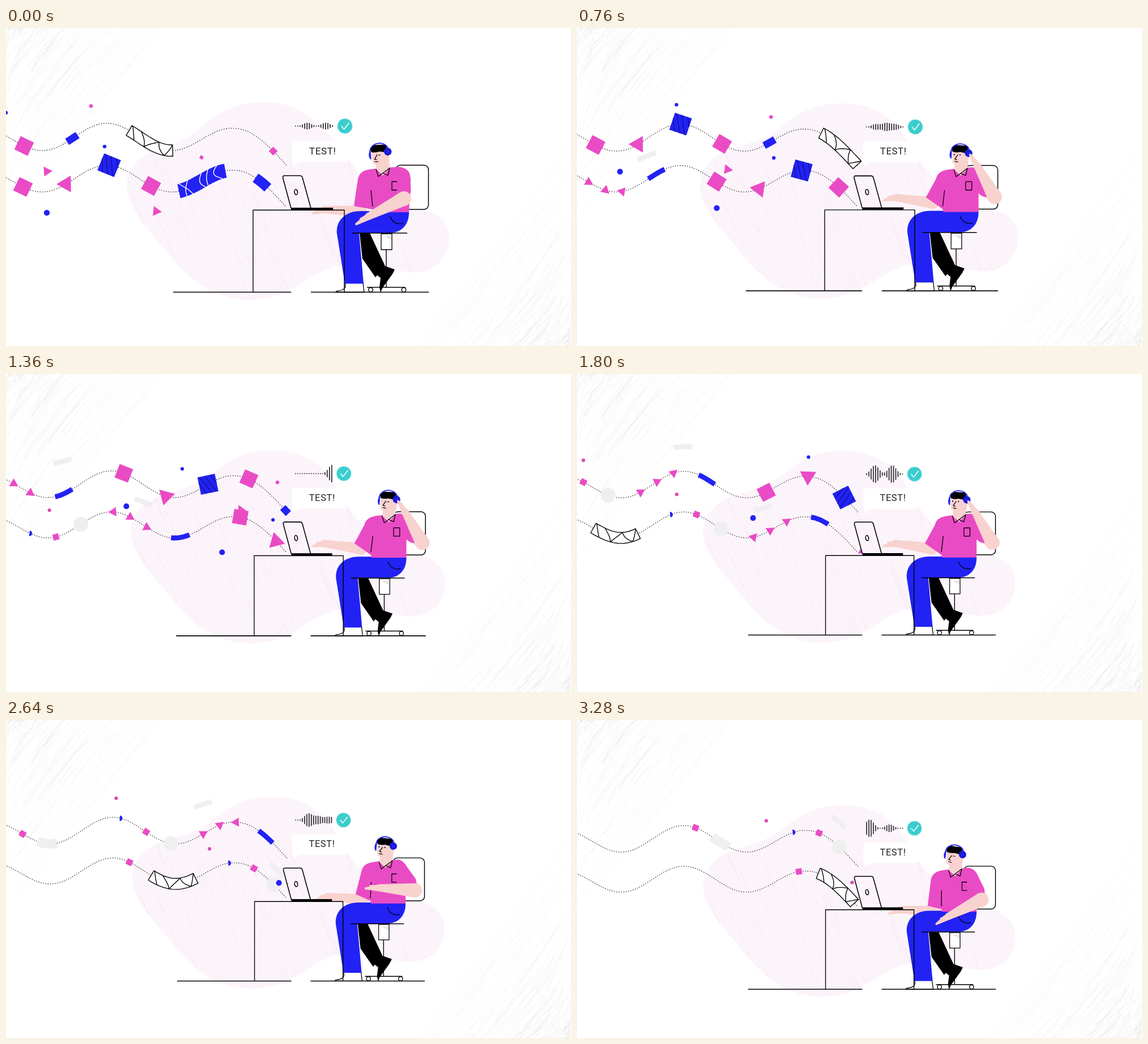
These frames come from a looping animation (997x561 px, 3.32 s). An HTML page with a canvas:

```html
<!DOCTYPE html>
<html lang="en">
<head>
<meta charset="utf-8">
<title>Sound test at the desk</title>
<style>
  html, body { margin: 0; width: 100%; height: 100%; overflow: hidden; background: #fff; }
  canvas { display: block; }
</style>
</head>
<body>
<canvas id="stage" width="997" height="561"></canvas>
<script>
const W = 997, H = 561, LOOP = 3320, STEP = 40;
const PINK = '#e94bc5', BLUE = '#2222f4', SKIN = '#f8d2ce', INK = '#000', GREY = '#efeff0';
const ctx = document.getElementById('stage').getContext('2d');
const DEG = Math.PI / 180;

// ---------- helpers ----------
const clamp = u => Math.min(Math.max(u, 0), 1);
const mix = (a, b, u) => a + (b - a) * u;

function ramp(t, from, to) {
  const u = clamp((t - from) / (to - from));
  return u * u * (3 - 2 * u);
}

function random(seed) {
  return () => (seed = (seed * 16807) % 2147483647) / 2147483647;
}

function paint(path, fill, stroke, width = 1.5) {
  const p = typeof path === 'string' ? new Path2D(path) : path;
  if (fill) { ctx.fillStyle = fill; ctx.fill(p); }
  if (stroke) { ctx.strokeStyle = stroke; ctx.lineWidth = width; ctx.stroke(p); }
}

function poly(points, closed = true) {
  const p = new Path2D();
  points.forEach(([x, y], i) => i ? p.lineTo(x, y) : p.moveTo(x, y));
  if (closed) p.closePath();
  return p;
}

function disc(x, y, r, fill, stroke, width) {
  const p = new Path2D();
  p.arc(x, y, r, 0, 7);
  paint(p, fill, stroke, width);
}

// tapered limb between two round ends
function limb(x1, y1, r1, x2, y2, r2, color) {
  const a = Math.atan2(y2 - y1, x2 - x1) + Math.PI / 2;
  const c = Math.cos(a), s = Math.sin(a);
  paint(poly([[x1 + c * r1, y1 + s * r1], [x2 + c * r2, y2 + s * r2],
              [x2 - c * r2, y2 - s * r2], [x1 - c * r1, y1 - s * r1]]), color);
  disc(x1, y1, r1, color);
  disc(x2, y2, r2, color);
}

// ---------- tracks ----------
const PERIOD = 224, CREST = 178, LAST_CREST = CREST + PERIOD;

// a gentle wave that dives towards the laptop after its last crest
function track(base, amp) {
  const y = x => x < LAST_CREST
    ? base + 9 * ((x - CREST) / PERIOD) ** 2 - amp * Math.cos((x - CREST) / PERIOD * 2 * Math.PI)
    : base + 9 - amp + 63 * (1 - Math.cos(Math.PI * (x - LAST_CREST) / 182));
  const angle = x => Math.atan2(y(x + 2) - y(x - 2), 4);
  return { y, angle };
}

const upper = track(191, 23), lower = track(264.5, 22.5);
const high = track(148, 15), midA = track(223, 14), midB = track(240, 11), low = track(315, 9);

// place at distance s along and v across the track, seen from x
function offset(tr, x, s, v) {
  const px = x + s * Math.cos(tr.angle(x + s / 2));
  const a = tr.angle(px);
  return [px - v * Math.sin(a), tr.y(px) + v * Math.cos(a)];
}

// ---------- travelling shapes ----------
// a band that bends with its track, with slanted seams across it
function ribbon(len, wide, fill, stroke, seams = [], seamColor) {
  return (x, tr) => {
    const top = [], bottom = [];
    for (let i = 0; i <= 12; i++) {
      const s = (i / 12 - .5) * len;
      top.push(offset(tr, x, s, -wide / 2));
      bottom.unshift(offset(tr, x, s, wide / 2));
    }
    paint(poly(top.concat(bottom)), fill, stroke, 1.4);
    for (const [from, to, bow] of seams) {
      const line = [];
      for (let u = 0; u <= 1; u += .125) {
        const s = mix(from, to, u) + bow * Math.sin(Math.PI * u);
        line.push(offset(tr, x, s * len, (u - .5) * wide));
      }
      paint(poly(line, false), null, seamColor, 1.4);
    }
  };
}

function turned(draw, turn = a => a) {
  return (x, tr, t) => {
    ctx.save();
    ctx.translate(x, tr.y(x));
    ctx.rotate(turn(tr.angle(x), t));
    draw();
    ctx.restore();
  };
}

function square(size, turn) {
  return turned(() => {
    ctx.fillStyle = PINK;
    ctx.fillRect(-size / 2, -size / 2, size, size);
  }, turn);
}

function triangle(r, turn) {
  return turned(() => paint(poly([0, 120, 240].map(a =>
    [r * Math.cos(a * DEG), r * Math.sin(a * DEG)])), PINK), turn);
}

const dot = (r, color) => (x, tr) => disc(x, tr.y(x), r, color);

const striped = turned(() => {
  ctx.fillStyle = BLUE;
  ctx.fillRect(-16, -16, 32, 32);
  paint('M-16 -6L-6 16M-13 -16L4 16M-3 -16L13 16M8 -16L16 0', null, '#0d0d7c', 1.1);
}, a => a + 18 * DEG);

const half = turned(() => paint('M-2 -5A5 5 0 0 1 -2 5Z', BLUE), a => a * .3);
const wrap = ribbon(86, 20, '#fff', INK,
  [[-.48, -.3, 0], [-.27, -.06, .04], [.17, -.06, -.03], [.17, .35, -.03], [.5, .35, 0]], INK);
const blueWrap = ribbon(90, 25, BLUE, null,
  [[-.46, -.27, .03], [-.26, -.38, -.04], [.06, 0, -.08], [.2, .06, -.03], [.37, .4, -.12]], '#fff');
const bar = ribbon(34, 9, BLUE), greyBar = ribbon(34, 9, GREY), greyBlock = ribbon(35, 17, GREY);
const block = square(26), chip = square(11), gem = square(6, () => 30 * DEG);
const wedge = triangle(17, a => a + 90 * DEG);
const arrow = triangle(9.5, a => 60 * DEG - a);
const looseArrow = triangle(10, a => a * .6);
const greyDisc = dot(13.5, GREY), bead = dot(5.2, BLUE), blueDot = dot(3.2, BLUE), pinkDot = dot(3.2, '#d94bb4');

// both lanes carry the same train: [shape, gap to the one ahead]
const train = [[striped, 74], [wedge, 76], [block, 76], [bar, 108], [arrow, 61], [arrow, 30], [arrow, 30],
               [greyDisc, 59], [chip, 45], [half, 46]];
const lanes = [
  { tr: upper, speed: .29, start: 482, cars: [[chip, 0], [wrap, 229], [ribbon(22, 13, BLUE), 136], [block, 85],
    ...train, [greyBlock, 134], [chip, 45]] },
  { tr: lower, speed: .28, start: 457, cars: [[ribbon(28, 18, BLUE), 0], [blueWrap, 111], [block, 90],
    ...train, [wrap, 103], [chip, 79]] }
];

// loose bits: [speed, [shape, track, start], ...]
const drifters = [
  [.25, [gem, high, 150], [gem, midA, 345], [looseArrow, midB, 72], [looseArrow, low, 265]],
  [.225, [blueDot, high, 0], [pinkDot, high, -410], [blueDot, midA, 174], [pinkDot, midA, -240],
    [bead, midB, -101], [bead, low, 72]],
  [.197, [greyBar, track(138, 15), -178], [greyBar, midA, -32]]
];

// the dive is steeper, so shapes advance less there
function place(shape, tr, x, t) {
  if (x > 430) x = mix(430, x, .8);
  if (x > -70 && x < 540) shape(x, tr, t);
}

const opening = poly([[-80, 0], [507, 0], [507, 236], [490, 253], [489, 262], [503, 318],
                      [437, 320], [437, 420], [-80, 420]]);

function drawFlow(t) {
  ctx.setLineDash([1.6, 2.7]);
  for (const { tr } of lanes) {
    const line = [];
    for (let x = -15; x <= 496; x += 3) line.push([x, tr.y(x)]);
    paint(poly(line, false), null, '#1a1a1a', 1.2);
  }
  ctx.setLineDash([]);
  ctx.save();
  ctx.clip(opening);
  for (const { tr, speed, start, cars } of lanes) {
    let x = start + speed * t;
    for (const [shape, gap] of cars) place(shape, tr, x -= gap, t);
  }
  for (const [speed, ...bits] of drifters) {
    for (const [shape, tr, start] of bits) place(shape, tr, start + speed * t, t);
  }
  ctx.restore();
}

// ---------- backdrop ----------
const scribble = document.createElement('canvas');
scribble.width = W;
scribble.height = H;
{
  const g = scribble.getContext('2d'), rnd = random(77);
  for (const corner of [0, 1]) {
    g.save();
    if (corner) { g.translate(W, H); g.rotate(Math.PI); }
    for (let i = 0; i < 300; i++) {
      const d = 15 + 265 * Math.pow(rnd(), 1.25);
      const u = rnd() * .8, v = u + .15 + rnd() * .35;
      const at = k => [d * k, d * 1.3 * (1 - k) - 40 * k * (1 - k)];
      const [x1, y1] = at(u), [x2, y2] = at(v);
      g.strokeStyle = `rgba(60,60,60,${.012 + .04 * rnd() * (1 - d / 320)})`;
      g.lineWidth = .5 + rnd() * 1.3;
      g.beginPath();
      g.moveTo(x1, y1);
      g.quadraticCurveTo((x1 + x2) / 2 - 6, (y1 + y2) / 2 - 6, x2, y2);
      g.stroke();
    }
    g.restore();
  }
}

function drawBlob(t) {
  const k = 14 * ramp(t, 0, 900);
  const blob = new Path2D(`M${455 + k} 131C${500 + k} 131 ${530 + k} 147 ${556 + k} 174C590 205 606 240 640 275` +
    'C675 308 700 312 735 320C768 328 782 348 782 372C781 405 757 431 720 431C682 431 655 415 610 416' +
    'C560 418 535 446 500 463C465 480 430 484 395 476C340 462 308 426 278 388C250 353 213 318 213 278' +
    `C214 243 240 222 275 210C312 200 ${328 + k} 190 ${352 + k} 168C${385 + k} 140 ${420 + k} 131 ${455 + k} 131Z`);
  paint(blob, '#fcf4fb');
  ctx.save();
  ctx.clip(blob);
  const rnd = random(19);
  for (let i = 0; i < 90; i++) {
    const x = 210 + rnd() * 540, y = 200 + rnd() * 250, len = 25 + rnd() * 60;
    paint(poly([[x, y], [x + len * .42, y + len]], false), null, 'rgba(246,205,234,.2)', 1 + rnd());
  }
  ctx.restore();
}

// ---------- sound bubble ----------
// bursts of sound: [time, loudness]
const bursts = [[-380, 6], [-100, 6], [340, 5], [500, 7], [640, 5], [1370, 16], [1640, 16],
                [2280, 12], [2430, 7], [2590, 6], [2770, 16], [3080, 7]];
const loudness = s => bursts.reduce((sum, [at, peak]) => sum + peak * Math.exp(-(((s - at) / 85) ** 2)), 0);

function drawBubble(t) {
  paint('M505 199H604V236H519L507 244L505 236Z', '#fff');
  ctx.fillStyle = '#222226';
  ctx.font = '17px Roboto, Arial, sans-serif';
  ctx.letterSpacing = '0.6px';
  ctx.fillText('TEST!', 535, 222.5);
  for (let i = 0; i <= 16; i++) {
    const h = Math.max(loudness(t - (16 - i) * 35), .8);
    ctx.fillRect(510 + i * 4.08, 173 - h, 1.7, h * 2);
  }
  disc(598, 173, 14, '#c9f0f0');
  disc(598, 173, 12.8, '#3bcdce');
  paint('M592 173L596.5 178.5L605.5 167', null, '#fff', 1.5);
}

// ---------- person ----------
const folded = { head: [0, -.06], chest: [0], elbow: [702, 301], hand: [618, 346], far: [541, 327], cuff: [614, 314] };
const resting = { head: [11, .13], chest: [7], elbow: [720, 303], hand: [638, 347], far: [552, 328], cuff: [622, 314] };
const listening = { head: [19, .06], chest: [14], elbow: [740, 298], hand: [696, 223], far: [542, 304], cuff: [617, 299] };

function blend(a, b, u) {
  const out = {};
  for (const key in a) out[key] = a[key].map((v, i) => mix(v, b[key][i], u));
  return out;
}

function poseAt(t) {
  const rise = ramp(t, 360, 740), up = rise - ramp(t, 2300, 2900);
  const p = blend(blend(folded, resting, ramp(t, 0, 320)), listening, up);
  p.elbow[0] += 30 * Math.sin(Math.PI * rise);
  p.hand[0] -= 24 * Math.sin(Math.PI * up);
  p.raised = up > .5;
  return p;
}

function forearm(x, y, r, [hx, hy], reach, lift) {
  const d = Math.hypot(x - hx, y - hy);
  const wx = hx + (x - hx) / d * reach, wy = hy + (y - hy) / d * reach - lift;
  limb(x, y, r, wx, wy, 6.5, SKIN);
  limb(wx, wy, 6.5, hx, hy, 2, SKIN);
  limb(wx, wy, 5, mix(hx, wx, .35), mix(hy, wy, .35) - 4, 2, SKIN);
}

function drawChair() {
  const back = new Path2D();
  back.roundRect(688, 242, 57.5, 78, 8);
  paint(back, '#fff', INK);
  paint('M662 363H681V391H662Z', '#fff', INK, 1.3);
  paint('M667 367H680V374Z', '#e4e4e6');
  paint('M671 391V457M637 457.5H705', null, INK, 1.4);
  for (const x of [643.5, 702]) disc(x, 461.8, 3.8, '#fff', INK, 1.4);
}

function drawLegs() {
  paint('M624 362H642L669 420L686 426L682 434L664 459L661 467L659 457L661 441L655 436L652 440L629 407Z', INK);
  paint('M598 450C601 458 597 463 584 464L582 466H632L630 450Z', '#fff', INK, 1.3);
  paint('M625 323H711C712 346 699 361.5 676 361.5H623L631 451H598L584.5 366C580 341 598 323 625 323Z', BLUE);
  paint('M678 332C681 343 690 347 701 345', null, INK, 1.2);
  paint('M611 361.8H708', null, INK, 1.6);
}

function drawHead([shift, tilt], chest, blink) {
  paint(`M${653 + chest} 249L${652 + shift} 228L${676 + shift} 222L${677 + chest} 248L${665 + chest} 260Z`, SKIN);
  ctx.save();
  ctx.translate(660 + shift, 224);
  ctx.rotate(tilt);
  ctx.translate(-660, -224);
  paint('M644 216C639 217 639 230 644 231Z', BLUE);
  paint('M645 213H674V236L652 240Q646 240 646 235Z', SKIN);
  paint('M643 211Q648 205 656 206L670 206Q675 212 672 220L659 218Q650 220 645 218Z', INK);
  paint('M642 220C643 199 670 199 675 213', null, BLUE, 1.8);
  paint('M655 223L650 231L654 232M650 235L656 236', null, INK, 1.3);
  if (blink) paint('M657 224H661', null, INK, 1.1);
  else for (const x of [648.5, 659]) disc(x, 223, 1.1, INK);
  disc(674, 219, 6.8, BLUE);
  disc(674, 219, 4.2, BLUE, '#0c0c86', 1.1);
  ctx.restore();
}

function drawShirt(c, [cuffX, cuffY]) {
  paint(`M648 325L647 320L${cuffX} ${cuffY}L${621 + c} 266Q${624 + c} 251 ${645 + c} 249L${653 + c} 248` +
    `L${665 + c} 260L${677 + c} 246L${692 + c * .5} 245Q${712 - c * .1} 246 ${714 - c * .2} 266L711 325Z`, PINK);
}

function drawShirtLines(c, raised) {
  paint(`M${653 + c} 249L${657 + c} 262L${665 + c} 256L${674 + c} 260L${677 + c} 247L${665 + c} 256`, null, INK, 1.3);
  paint(`M${644 + c * .45} 286L647 315`, null, INK, 1.3);
  const x = 681 + c * .5;
  paint(raised ? `M${x} 271H${x + 11}V286H${x}Z` : `M${x + 9} 271H${x}V286H${x + 9}`, null, INK, 1.3);
}

function drawPerson(t) {
  const { head, chest: [c], elbow: [ex, ey], hand, far, cuff, raised } = poseAt(t);
  const blink = t < 120 || Math.abs(t - 1350) < 90 || t > 3180;
  const sx = 698, sy = 262;
  drawChair();
  forearm(cuff[0] + 13, cuff[1] + 10, 10.5, far, 22, 6);
  drawLegs();
  limb(sx, sy, 12, ex, ey, 12, SKIN);
  drawShirt(c, cuff);
  limb(sx, sy, 15, mix(sx, ex, .62), mix(sy, ey, .62), 14, PINK);
  drawHead(head, c, blink);
  drawShirtLines(c, raised);
  forearm(ex, ey, 13, hand, 26, 2);
}

function drawDesk() {
  paint('M436 466V321.3H597V466', null, INK, 1.4);
  paint('M295 466H503M538 466H746', null, INK, 1.7);
  paint('M503 318L488.5 264Q488 260.5 491.5 260.5H519Q522 260.5 523 263.5L538 318', null, INK, 1.6);
  paint('M503 319H577', null, INK, 4);
  const mark = new Path2D();
  mark.ellipse(511.7, 289.5, 2.7, 4.8, -.15, 0, 7);
  paint(mark, null, INK, 1.6);
}

// ---------- loop ----------
function render(t) {
  const scale = 1 - .031 * clamp(t / 1800);
  ctx.fillStyle = '#fff';
  ctx.fillRect(0, 0, W, H);
  ctx.drawImage(scribble, 0, 0);
  ctx.save();
  ctx.translate(519, 287 + 14.5 * ramp(t, 2640, 2840));
  ctx.scale(scale, scale);
  ctx.translate(-519, -287);
  ctx.lineJoin = 'round';
  drawBlob(t);
  drawFlow(t);
  drawBubble(t);
  drawPerson(t);
  drawDesk();
  ctx.restore();
}

const begin = performance.now();
function tick() {
  const t = (performance.now() - begin) % LOOP;
  render(Math.floor(t / STEP) * STEP);
  requestAnimationFrame(tick);
}
tick();
</script>
</body>
</html>
```
